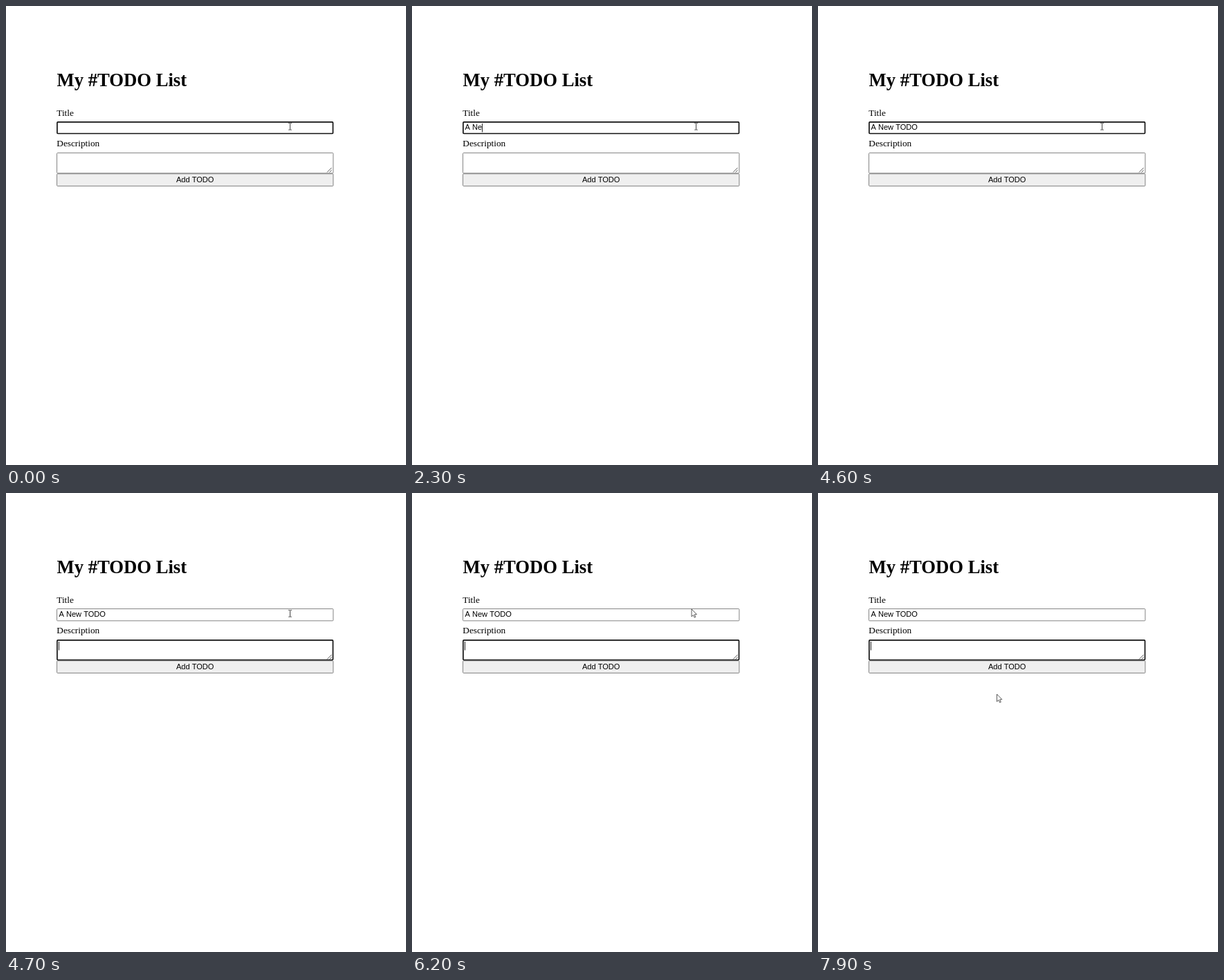
Write an HTML page with a canvas that moves like this. It is 578x664 px and loops after 8000 ms.

```html
<!DOCTYPE html>
<html lang="en">
<head>
<meta charset="utf-8">
<title>TODO list</title>
<style>
  html, body { margin: 0; width: 100%; height: 100%; overflow: hidden; background: #fff; }
  canvas { display: block; }
</style>
</head>
<body>
<canvas id="stage" width="578" height="664"></canvas>
<script>
const ctx = document.getElementById("stage").getContext("2d");
const LOOP = 8000;
const SERIF = '"Liberation Serif", "Times New Roman", serif';
const SANS = '"Liberation Sans", Arial, sans-serif';
const LABEL = `13.28px ${SERIF}`;
const FIELD = `11.07px ${SANS}`;
const FOCUS_AT = 4700;

// Each row is [start in ms, value]; a value holds until the next row.
const TYPED = [[0, 0], [1200, 1], [1400, 2], [2000, 3], [2100, 4], [2400, 5],
  [2600, 6], [3000, 7], [3400, 8], [3800, 9], [4100, 10]];
const CARET = [[0, false], [500, true], [1900, false], [2000, true], [4600, false],
  [4700, true], [5300, false], [5800, true], [6300, false], [6800, true],
  [7300, false], [7800, true]];
const POINTER = [
  [0, [beam, 410, 174]], [5900, [beam, 409, 173]], [6000, [arrow, 405, 169]],
  [6100, [arrow, 404, 168]], [7500, [arrow, 403, 167]], [7700, [arrow, 372, 200]],
  [7800, [arrow, 300, 262]], [7900, [arrow, 258.5, 291]]
];

function at(track, t) {
  let value = track[0][1];
  for (const [start, next] of track) if (t >= start) value = next;
  return value;
}

function text(str, x, y, font, align = "left") {
  ctx.font = font;
  ctx.textAlign = align;
  ctx.fillStyle = "#000";
  ctx.fillText(str, x, y);
}

function box(x, y, w, h, fill, focused) {
  const line = focused ? 1.66 : 0.9;
  const inset = line / 2;
  ctx.beginPath();
  ctx.roundRect(x + inset, y + inset, w - line, h - line, 1);
  ctx.fillStyle = fill;
  ctx.fill();
  ctx.lineWidth = line;
  ctx.strokeStyle = focused ? "#101010" : "#767676";
  ctx.stroke();
}

function strokePath(points, color, width) {
  ctx.beginPath();
  points.forEach(([x, y], i) => i ? ctx.lineTo(x, y) : ctx.moveTo(x, y));
  ctx.strokeStyle = color;
  ctx.lineWidth = width;
  ctx.stroke();
}

function resizer() {
  strokePath([[464, 240.5], [470.5, 234]], "#555", 1);
  strokePath([[467.5, 240.5], [470.5, 237.5]], "#555", 1);
}

function drawCaret(x, y) {
  ctx.fillStyle = "#222";
  ctx.fillRect(x, y, 1, 12.5);
}

function beam(x, y) {
  ctx.fillStyle = "#444";
  ctx.fillRect(x, y - 4.5, 1, 10);
  for (const dy of [-5, 4.7]) {
    ctx.fillRect(x - 2, y + dy, 2, 0.8);
    ctx.fillRect(x + 1, y + dy, 2, 0.8);
  }
}

function arrow(x, y) {
  const shape = [[0, 0], [0, 10.8], [2.5, 8.5], [4.2, 12.2], [5.8, 11.4], [4.2, 7.8], [7.4, 7.6]];
  ctx.beginPath();
  for (const [dx, dy] of shape) ctx.lineTo(x + dx, y + dy);
  ctx.closePath();
  ctx.fillStyle = "#fff";
  ctx.fill();
  ctx.strokeStyle = "#333";
  ctx.lineWidth = 0.8;
  ctx.stroke();
}

function draw(t) {
  const inArea = t >= FOCUS_AT;
  const title = "A New TODO".slice(0, at(TYPED, t));

  ctx.fillStyle = "#fff";
  ctx.fillRect(0, 0, 578, 664);

  text("My #TODO List", 73.5, 116, `bold 26.66px ${SERIF}`);
  text("Title", 73.3, 159, LABEL);
  text("Description", 73.3, 203, LABEL);

  box(73.1, 167.1, 400.2, 18.2, "#fff", !inArea);
  box(73.1, 242.3, 400.2, 18.6, "#efefef", false);
  box(73.1, 212.1, 400.2, 30.2, "#fff", inArea);
  resizer();

  text("Add TODO", 273.2, 255, FIELD, "center");
  text(title, 76.5, 179, FIELD);

  if (at(CARET, t)) {
    if (inArea) drawCaret(76, 215);
    else drawCaret(Math.round(76.2 + ctx.measureText(title).width), 170);
  }

  const [shape, x, y] = at(POINTER, t);
  shape(x, y);
}

const begin = performance.now();
function tick() {
  draw((performance.now() - begin) % LOOP);
  requestAnimationFrame(tick);
}
tick();
</script>
</body>
</html>
```
